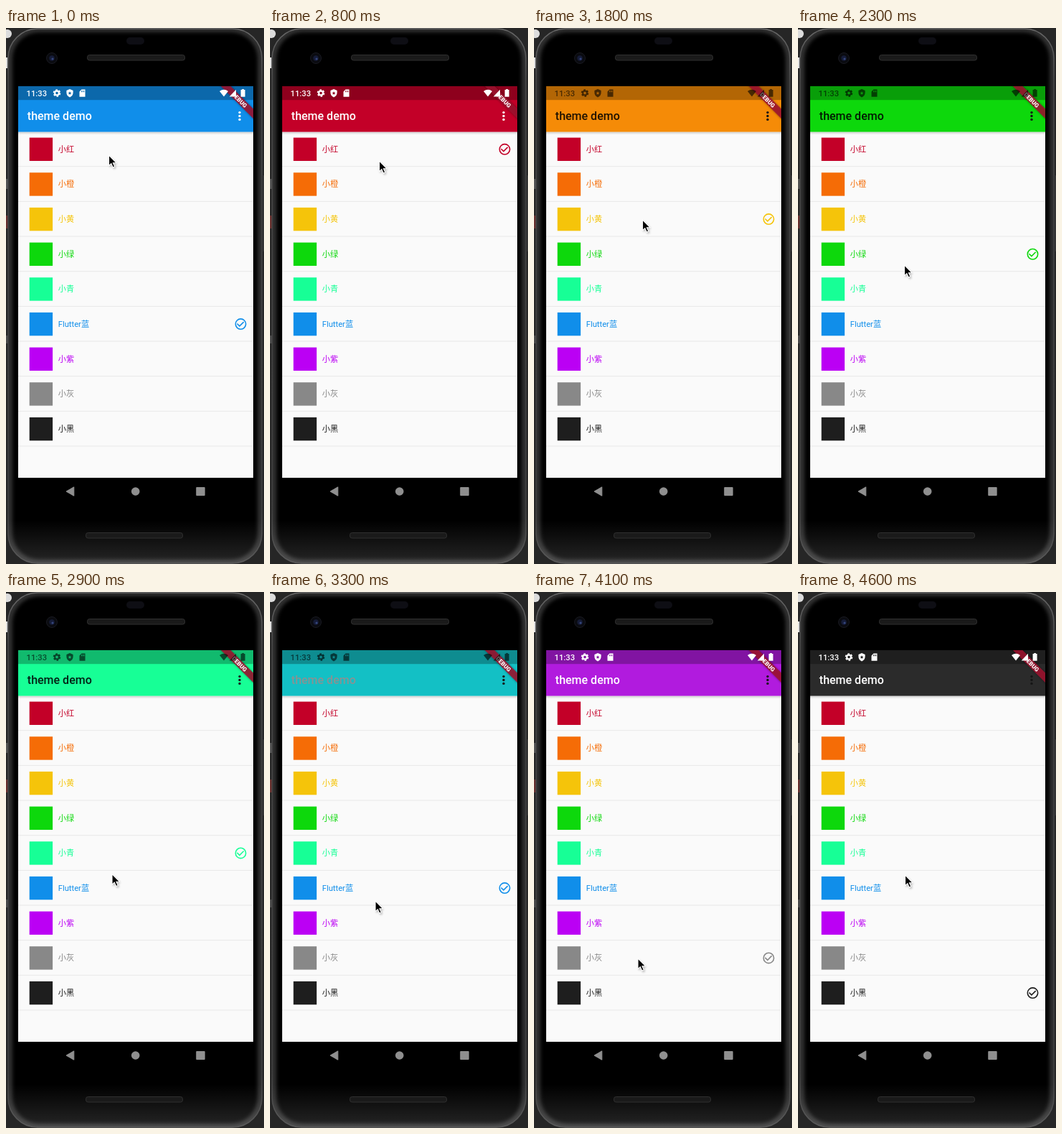
An HTML page that plays this animation: 360x746 px, repeating every 4700 ms.

```html
<!DOCTYPE html>
<html lang="zh-CN">
<head>
<meta charset="utf-8">
<title>theme demo</title>
<style>
  html, body { margin: 0; width: 100%; height: 100%; overflow: hidden; background: #232323; }
  svg { display: block; width: 360px; height: 746px; }
  text { font-family: Roboto, "Noto Sans CJK SC", "Noto Sans CJK", sans-serif; }
</style>
</head>
<body>
<svg viewBox="0 0 360 746">
  <defs>
    <linearGradient id="rim" x2="0" y2="1">
      <stop offset="0" stop-color="#6a6a6a"/>
      <stop offset=".1" stop-color="#484848"/>
      <stop offset=".9" stop-color="#404040"/>
      <stop offset="1" stop-color="#5c5c5c"/>
    </linearGradient>
    <linearGradient id="sheen" x2="0" y2="1">
      <stop offset="0" stop-color="#fff" stop-opacity="0"/>
      <stop offset="1" stop-color="#fff" stop-opacity=".15"/>
    </linearGradient>
    <linearGradient id="drop" x2="0" y2="1">
      <stop offset="0" stop-color="#000" stop-opacity=".17"/>
      <stop offset="1" stop-color="#000" stop-opacity="0"/>
    </linearGradient>
    <clipPath id="screen"><rect x="17" y="81" width="328" height="545"/></clipPath>
    <clipPath id="body"><rect x="3" y="1" width="354" height="744" rx="41"/></clipPath>
    <filter id="soft" x="-50%" y="-100%" width="200%" height="300%"><feGaussianBlur stdDeviation="1.6"/></filter>
    <filter id="edge"><feGaussianBlur stdDeviation="2.5"/></filter>
  </defs>

  <!-- desktop behind the phone -->
  <rect width="360" height="746" fill="#262626"/>
  <circle cx="2" cy="8" r="6" fill="#dcdcdc"/>
  <rect y="41" width="2" height="15" fill="#ddd"/>
  <rect y="210" width="3" height="14" fill="#555"/>
  <rect y="261" width="3" height="18" fill="#69302e"/>
  <rect y="428" width="3" height="11" fill="#4a4a4a"/>

  <!-- phone body -->
  <g clip-path="url(#body)">
    <rect width="360" height="746" fill="#303030"/>
    <rect x="9" y="6" width="342" height="734" rx="37" fill="#000" filter="url(#edge)"/>
    <rect y="685" width="360" height="61" fill="url(#sheen)"/>
  </g>
  <rect x="3" y="1" width="354" height="744" rx="41" fill="none" stroke="url(#rim)" stroke-width="1.5"/>
  <rect x="357" y="205" width="3" height="106" rx="1" fill="#343434"/>
  <rect x="168" y="13" width="25" height="10" rx="5" fill="#0e0e14"/>
  <circle cx="64" cy="42" r="7.5" fill="#0a0b10" stroke="#191a21"/>
  <circle cx="64" cy="42" r="3.7" fill="#161c38"/>
  <circle cx="65" cy="43" r="1.6" fill="#35477e"/>
  <g fill="#1a1a1a" stroke="#303030">
    <rect x="113.5" y="37.5" width="136" height="7.5" rx="3"/>
    <rect x="111.5" y="702.5" width="135" height="7.5" rx="3"/>
  </g>
  <g fill="#8f8f8f">
    <path d="M84 645 94.8 638.8V651.2Z" stroke="#8f8f8f" stroke-linejoin="round"/>
    <circle cx="180.7" cy="645" r="5.8"/>
    <rect x="265.2" y="639" width="12.5" height="12" rx="1"/>
  </g>

  <g clip-path="url(#screen)">
    <rect x="17" y="81" width="328" height="545" fill="#fafafa"/>
    <g id="rows"></g>
    <path id="check" d="M16.59 7.58 10 14.17 6.41 10.59 5 12l5 5 8-8ZM12 2a10 10 0 1 0 0 20 10 10 0 0 0 0-20Zm0 18a8 8 0 1 1 0-16 8 8 0 0 1 0 16Z"/>
    <rect x="17" y="144.6" width="328" height="4" fill="url(#drop)"/>
    <rect id="bar" x="17" y="81" width="328" height="63.6"/>
    <text id="title" x="29.8" y="128.3" font-size="16" font-weight="500">theme demo</text>
    <g id="dots">
      <circle cx="326" cy="117.6" r="1.7"/>
      <circle cx="326" cy="122.5" r="1.7"/>
      <circle cx="326" cy="127.4" r="1.7"/>
    </g>

    <!-- system status bar, debug ribbon -->
    <rect x="17" y="81" width="328" height="19.2" fill-opacity=".27"/>
    <g transform="translate(345 81) rotate(45)">
      <rect x="-34" y="22.3" width="68" height="9.6" opacity=".4" filter="url(#soft)"/>
      <rect x="-34" y="22.3" width="68" height="9.6" fill="#a3122f" fill-opacity=".85"/>
      <text y="30" font-size="8.1" font-weight="900" text-anchor="middle" fill="#fff">DEBUG</text>
    </g>
    <g id="status">
      <text x="28.6" y="94.8" font-size="11.2" font-weight="500">11:33</text>
      <g fill="none" stroke="currentColor">
        <circle cx="71" cy="90.6" r="2.9" stroke-width="2.2"/>
        <circle cx="71" cy="90.6" r="4.5" stroke-width="1.7" stroke-dasharray="2.6 2.11"/>
      </g>
      <path fill-rule="evenodd" d="M89 85 93.6 87V90.3Q93.4 94.7 89 96.4 84.6 94.7 84.4 90.3V87ZM89 88.2 88.3 89.8 86.6 90 87.9 91.1 87.5 92.8 89 91.9 90.5 92.8 90.1 91.1 91.4 90 89.7 89.8Z"/>
      <path fill-rule="evenodd" d="M105.5 85.5H110.5V95.7H102.5V88.5ZM105.1 87.2V89.3H106V87.2ZM106.8 87.2V89.3H107.7V87.2ZM108.5 87.2V89.3H109.4V87.2Z"/>
      <path d="M298 87.9Q304 83.4 310 87.9L304 95.5Z"/>
      <path d="M321 85.7V95.5H311.7Z"/>
      <path d="M329.3 86V85H331.9V86H333.6V95.7H327.6V86Z"/>
    </g>
  </g>

  <g id="cursor">
    <path d="M1 2V17L4.5 13.8 7 19.5 10 18 7.7 12.5H12Z" opacity=".3" filter="url(#soft)"/>
    <path d="M0 0V14.6L3.3 11.6 5.7 17 8.2 15.9 5.9 10.7H10.5Z" fill="#000" stroke="#fff" stroke-width="1.1"/>
  </g>
</svg>
<script>
  const LOOP = 4700, STEP = 100, FADE = 200, PITCH = 48.66;
  const $ = id => document.getElementById(id);

  // label, colour, whether the bar carries dark text
  const themes = [
    ['小红', [195, 0, 40], 0],
    ['小橙', [245, 108, 6], 1],
    ['小黄', [245, 196, 10], 1],
    ['小绿', [13, 216, 12], 1],
    ['小青', [23, 255, 150], 1],
    ['Flutter蓝', [16, 142, 234], 0],
    ['小紫', [187, 0, 244], 0],
    ['小灰', [136, 136, 136], 0],
    ['小黑', [30, 30, 30], 0]
  ];
  // time of tap, chosen theme
  const taps = [[-FADE, 5], [600, 0], [1180, 1], [1730, 2], [2100, 3],
    [2640, 4], [3188, 5], [3620, 6], [4060, 7], [4425, 8]];
  // time, x, y of the pointer tip
  const path = [[0, 143.5, 177], [300, 152.5, 185], [800, 152.5, 185], [1100, 152, 222],
    [1200, 152, 228], [1600, 151.5, 267], [1800, 151.5, 267], [2050, 149, 326],
    [2300, 148.5, 330], [2400, 148.5, 348], [2650, 148, 376], [2800, 148, 380],
    [3000, 148, 405], [3150, 147, 430], [3300, 147, 430], [3600, 146, 465],
    [3800, 146, 470], [4000, 145, 508], [4100, 145, 510], [4300, 146, 560],
    [4400, 147, 568], [4500, 148, 480], [4600, 149.5, 394]];

  const mix = (a, b, u) => a + (b - a) * u;
  const rgb = c => `rgb(${c.map(Math.round)})`;
  const lastAt = (table, t) => table.reduce((n, row, i) => row[0] <= t ? i : n, 0);

  $('rows').innerHTML = themes.map(([label, color], i) => {
    const y = 144.8 + i * PITCH, fill = rgb(color);
    return `<rect x="32.7" y="${y + 7.8}" width="32.4" height="32.4" fill="${fill}"/>
      <text x="72.8" y="${y + 28}" font-size="11.2" fill="${fill}">${label}</text>
      <rect x="17" y="${y + 47.4}" width="328" height="1" fill="#e8e8e8"/>`;
  }).join('');

  function paintTheme(t) {
    const n = lastAt(taps, t);
    const [start, pick] = taps[n];
    const [, to, toDark] = themes[pick];
    const [, from, fromDark] = themes[taps[Math.max(0, n - 1)][1]];
    const u = Math.min(1, (t - start) / FADE);

    $('bar').setAttribute('fill', rgb(from.map((c, i) => mix(c, to[i], u))));
    const dark = mix(fromDark, toDark, u);
    const tone = 255 * (1 - dark);
    $('title').setAttribute('fill', rgb([tone, tone, tone]));
    $('title').setAttribute('fill-opacity', 1 - .13 * dark);

    const dim = u < 1 ? fromDark : toDark;
    const status = dim ? 'rgba(0,0,0,.6)' : '#fff';
    $('status').setAttribute('fill', status);
    $('status').style.color = status;
    // the menu keeps its dark icon once it has changed
    $('dots').setAttribute('fill', n >= 2 ? '#151515' : '#fff');

    $('check').setAttribute('fill', rgb(to));
    $('check').setAttribute('transform',
      `translate(317.9 ${159.2 + pick * PITCH}) scale(.798)`);
  }

  function paintCursor(t) {
    const i = lastAt(path, t);
    const a = path[i], b = path[i + 1] || a;
    const u = a === b ? 0 : (t - a[0]) / (b[0] - a[0]);
    $('cursor').setAttribute('transform',
      `translate(${mix(a[1], b[1], u)} ${mix(a[2], b[2], u)})`);
  }

  function frame(now) {
    const t = Math.floor(now % LOOP / STEP) * STEP;
    paintTheme(t);
    paintCursor(t);
  }

  const origin = performance.now();
  (function tick() {
    frame(performance.now() - origin);
    requestAnimationFrame(tick);
  })();
</script>
</body>
</html>
```
